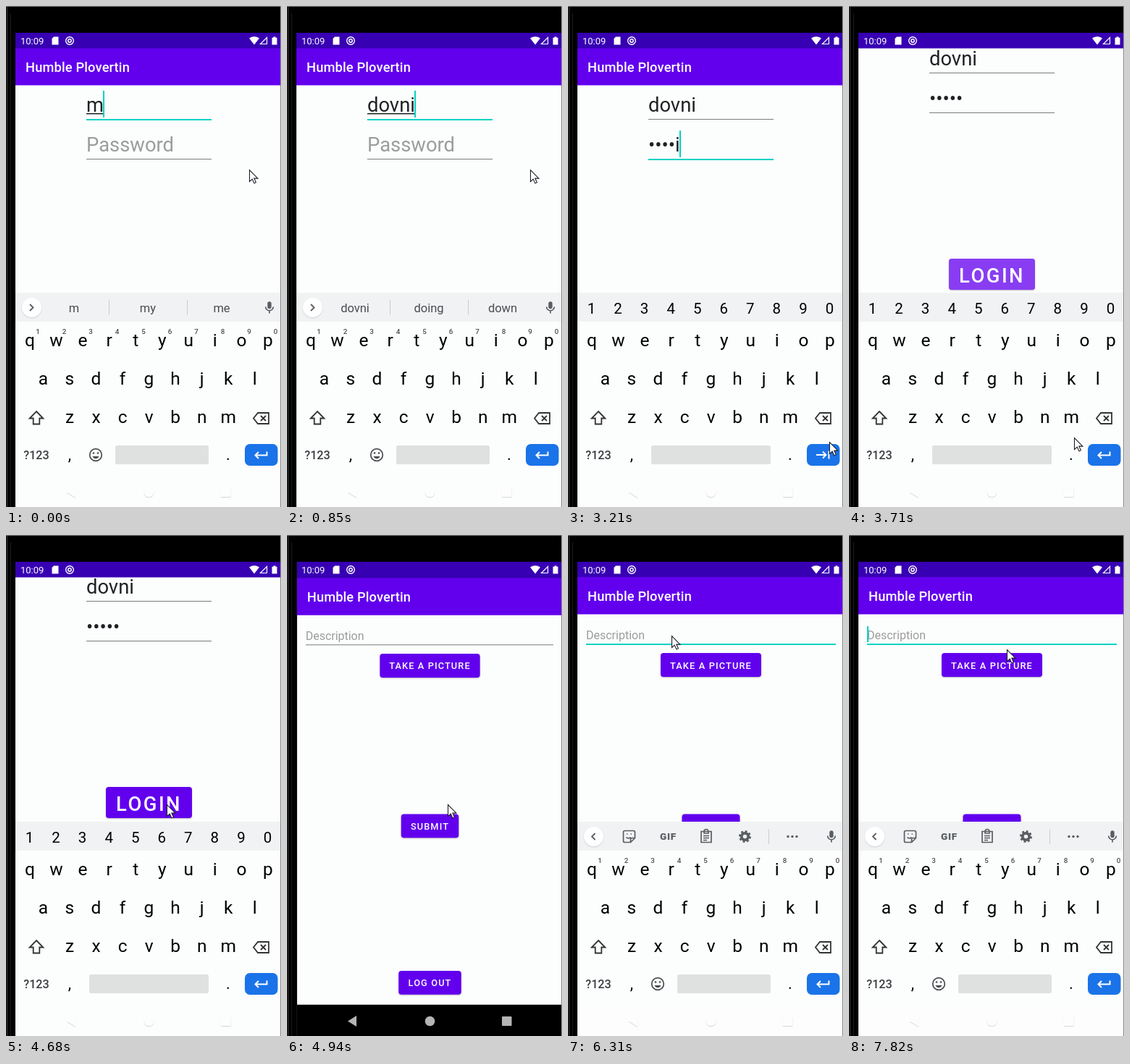
Recreate the animation shown at these times as an HTML page with a canvas. Size 380 by 692 pixels, loop 8 s.

```html
<!DOCTYPE html>
<html lang="en">
<head>
<meta charset="utf-8">
<title>Login demo</title>
<style>
  html, body { margin: 0; width: 100%; height: 100%; overflow: hidden; background: #000; }
  canvas { display: block; }
</style>
</head>
<body>
<canvas id="stage" width="380" height="692"></canvas>
<script>
const W = 380, H = 692, LOOP = 8000, TAU = Math.PI * 2;
const APP = 'Humble Plovertin', USER = 'dovni';
const PURPLE = '#6200ee', DARK_PURPLE = '#3700b3', TEAL = '#03d2c3', PAGE = '#fcfdfd';
const INK = '#202124', ICON = '#5a5d61', HINT = '#9c9c9c', LINE = '#7c7c7c', KEY = '#000';
const BIG = 27.4, SMALL = 12.8;

const stage = document.getElementById('stage').getContext('2d');
const layer = new OffscreenCanvas(W, H).getContext('2d');
let g = stage;

// Last row [time, ...values] that has begun.
const at = (t, rows) => rows.findLast(row => row[0] <= t).slice(1);
const within = (t, a, b) => t >= a && t < b;
const mixGray = (a, b, k) => { const v = Math.round(a + (b - a) * k); return `rgb(${v},${v},${v})`; };

function rect(x, y, w, h, color, radius = 0) {
  g.fillStyle = color;
  g.beginPath();
  g.roundRect(x, y, w, h, radius);
  g.fill();
}

function disc(x, y, r, color) {
  g.fillStyle = color;
  g.beginPath();
  g.arc(x, y, r, 0, TAU);
  g.fill();
}

function ring(x, y, r, color, width, dash = []) {
  g.strokeStyle = color;
  g.lineWidth = width;
  g.setLineDash(dash);
  g.beginPath();
  g.arc(x, y, r, 0, TAU);
  g.stroke();
  g.setLineDash([]);
}

function setFont(size, weight = 400, spacing = 0) {
  g.font = `${weight} ${size}px Roboto, sans-serif`;
  g.letterSpacing = spacing + 'px';
}

function text(str, x, y, size, color, { weight = 400, align = 'left', spacing = 0 } = {}) {
  setFont(size, weight, spacing);
  g.textAlign = align;
  g.fillStyle = color;
  g.fillText(str, x, y);
}

function shape(d, x, y, { fill, stroke, width = 1.8 }) {
  const path = new Path2D(d);
  g.save();
  g.translate(x, y);
  if (fill) { g.fillStyle = fill; g.fill(path); }
  if (stroke) { g.strokeStyle = stroke; g.lineWidth = width; g.stroke(path); }
  g.restore();
}

function withShadow(blur, dy, alpha, draw) {
  g.save();
  g.shadowColor = `rgba(0,0,0,${alpha})`;
  g.shadowBlur = blur;
  g.shadowOffsetY = dy;
  draw();
  g.restore();
}

// Draws a group off screen so that it fades as one.
function faded(alpha, draw) {
  layer.clearRect(0, 0, W, H);
  g = layer;
  draw();
  g = stage;
  g.globalAlpha = alpha;
  g.drawImage(layer.canvas, 0, 0);
  g.globalAlpha = 1;
}

function button(label, x, y, w, h, size, baseline, glow = 0) {
  withShadow(2, 1, 0.25, () => rect(x, y, w, h, PURPLE, 4));
  rect(x, y, w, h, `rgba(255,255,255,${glow})`, 4);
  text(label, x + w / 2, baseline, size, '#fff', { weight: 500, align: 'center', spacing: size * 0.089 });
}

function underline(x, y, w, focused) {
  rect(x, y, w, focused ? 2 : 1, focused ? TEAL : LINE);
}

function toolbar() {
  rect(13, 58, 368, 51.5, PURPLE);
  text(APP, 27, 91, 18.3, '#fff', { weight: 500, spacing: 0.15 });
}

function statusIcons() {
  text('10:09', 20, 53, 13, '#fff');
  shape('M-2-5.5H4.5V5.5H-4.5V-3z', 68, 48, { fill: '#fff' });
  ring(88, 48, 5.3, '#fff', 1.4);
  ring(88, 48, 2.2, '#fff', 1.5);
  shape('M-7-3.5Q0-8 7-3.5L0 5.5z', 343, 48, { fill: '#fff' });
  shape('M4.5-4.5V4.5H-4.5z', 356, 48, { stroke: '#fff', width: 1.2 });
  shape('M-1.5-5.5h3v1.2H3.5V5.5h-7V-4.3h2z', 371, 48, { fill: '#fff' });
}

// Icons turn from gray on black to white with a faint lower edge.
function navIcons(light) {
  const color = mixGray(181, 253, light);
  withShadow(1, 1, 0.16 * light, () => {
    shape('M-6 0L6-7.5V7.5z', 90, 671.5, { fill: color });
    disc(197.5, 671.5, 6.8, color);
    rect(297, 665, 13.5, 13, color, 1);
  });
}

function caretOn(t) {
  return !(within(t, 2340, 2850) || within(t, 3330, 3590) || within(t, 6310, 6810) || within(t, 7310, 7820));
}

function userText(t) {
  if (t < 250) return 'm';
  return USER.slice(0, Math.min(USER.length, Math.floor((t - 250) / 120)));
}

function passwordText(t) {
  if (t < 1360) return '';
  const count = Math.min(USER.length, 1 + Math.floor((t - 1360) / 120));
  return t < 3330 ? '•'.repeat(count - 1) + USER[count - 1] : '•'.repeat(count);
}

function bigField(value, hint, lineY, focused, composing, t) {
  const x = 111, baseline = lineY - 10;
  text(value || hint, x, baseline, BIG, value ? INK : HINT);
  const width = value ? g.measureText(value).width : 0;
  if (composing && width) rect(x, baseline + 2, width, 1.5, INK);
  if (focused && caretOn(t)) rect(Math.max(x, Math.round(x + width) - 1), lineY - 39, 2, 37, TEAL);
  underline(x, lineY, 173, focused);
}

function loginScreen(t) {
  const [scroll] = at(t, [[0, 0], [3590, 42], [3710, 64], [3830, 65]]);
  const [glow] = at(t, [[0, 0], [3590, 0.24], [4320, 0.19], [4440, 0.13], [4560, 0.06], [4680, 0]]);
  rect(13, 37, 366, 655, PAGE);
  g.save();
  g.translate(0, -scroll);
  toolbar();
  bigField(userText(t), 'Username', 156, t < 1100, t < 1100, t);
  bigField(passwordText(t), 'Password', 211, within(t, 1100, 3590), false, t);
  button('LOGIN', 138, 413, 119, 43, BIG, 445.5, glow);
  g.restore();
  rect(13, 37, 366, 21.5, DARK_PURPLE);
}

// Reaches a little past the glass so that its scaled form still fills it.
function postScreen(t) {
  const focused = t >= 5690;
  rect(13, 35, 368, 720, PAGE);
  rect(13, 35, 368, 24, DARK_PURPLE);
  toolbar();
  text('Description', 25, 144, 16, HINT);
  underline(25, 150, focused ? 345 : 344, focused);
  if (t >= 5830 && caretOn(t)) rect(25, 126, 2, 22, TEAL);
  button('TAKE A PICTURE', 128, 163, 139, 33, SMALL, 184.5);
  button('SUBMIT', 157.5, 385.5, 80, 33, SMALL, 406.7);
  button('LOG OUT', 154, 603, 87, 33, SMALL, 624.3);
}

function mic() {
  shape('M-2.7-5a2.7 2.7 0 0 1 5.4 0v4.5a2.7 2.7 0 0 1-5.4 0z', 364, 416, { fill: ICON });
  shape('M-5.3-.5a5.3 5.3 0 0 0 10.6 0M0 5v3.5', 364, 416, { stroke: ICON, width: 1.7 });
}

function expander(closed) {
  withShadow(2, 1, 0.14, () => disc(35.5, 416.5, 13.5, '#fff'));
  shape(closed ? 'M-2.5-4.5L2 0-2.5 4.5' : 'M2-4.5L-2.5 0 2 4.5', 35.5, 416.5, { stroke: ICON });
}

function toolStrip() {
  const pen = { stroke: ICON, width: 1.7 };
  expander(false);
  shape('M-8-6a2 2 0 0 1 2-2H6a2 2 0 0 1 2 2V2L2 8H-6a2 2 0 0 1-2-2zM8 2H4a2 2 0 0 0-2 2V8M-4 1a4 4 0 0 0 6 0M-3.5-3.5h1.5M2-3.5h1.5', 84.5, 416.5, pen);
  text('GIF', 138.5, 421.3, 13.5, ICON, { weight: 900, align: 'center', spacing: 0.8 });
  shape('M-7-6.5H7V8.5H-7zM-3-6.5a3 3 0 0 1 6 0v2.5H-3zM-4-.5H4M-4 2.5H4M-4 5.5H1', 191, 416, pen);
  ring(244.5, 416.5, 7, ICON, 3, [TAU * 7 / 16, TAU * 7 / 16]);
  ring(244.5, 416.5, 4.7, ICON, 3.8);
  rect(277, 406, 1, 21, '#cbcdd0');
  for (const x of [304, 310, 316]) disc(x, 416.5, 1.7, ICON);
  mic();
}

function wordStrip(t) {
  const words = at(t, [
    [0, 'm', 'my', 'me'], [370, 'd', 'do', 'did'], [490, 'do', 'don’t', 'down'],
    [610, 'dov', 'dove', 'doves'], [730, 'dovn', 'down', 'dove'], [850, USER, 'doing', 'down'],
  ]);
  expander(true);
  words.forEach((word, i) => text(word, 94 + i * 102, 422.5, 16.5, '#4a4c50', { align: 'center' }));
  rect(142, 406, 1, 21, '#cbcdd0');
  rect(250, 406, 1, 21, '#cbcdd0');
  mic();
}

function keyRow(letters, x, y, size = 24.5) {
  [...letters].forEach((key, i) => text(key, x + i * 36.55, y, size, KEY, { align: 'center' }));
}

function keyboard(t, strip) {
  const secret = strip === 'digits';
  rect(13, 396, 366, 296, PAGE);
  rect(13, 396, 366, 40, '#f0f2f4');
  if (secret) keyRow('1234567890', 32.5, 425, 20.5);
  else if (strip === 'tools') toolStrip();
  else wordStrip(t);

  keyRow('qwertyuiop', 33, 470);
  keyRow('asdfghjkl', 51.3, 523);
  keyRow('zxcvbnm', 88, 576);
  if (!secret) [...'1234567890'].forEach((n, i) =>
    text(n, 44 + i * 36.5, 452.5, 9.8, '#4a4c50', { weight: 500, align: 'center' }));

  shape('M0-9L9.3.5H4.3V8.5H-4.3V.5H-9.3z', 42, 569, { stroke: '#333' });
  shape('M-4.5-7.5H10.5V7.5H-4.5L-10.5 0zM-.5-3.5l7 7m0-7l-7 7', 352.5, 569.5, { stroke: '#333' });
  text('?123', 42, 626, 16.2, '#3c3e42', { weight: 500, align: 'center' });
  text(',', 88, 627, 22, KEY, { align: 'center' });
  text('.', 307, 627, 22, KEY, { align: 'center' });
  const spaceX = secret ? 115 : 151;
  rect(spaceX, 607, 280 - spaceX, 26, '#dfe1e1', 2.5);
  if (!secret) {
    ring(124, 620, 8.3, '#4a4c50', 1.7);
    disc(121, 617.5, 1.3, '#4a4c50');
    disc(127, 617.5, 1.3, '#4a4c50');
    shape('M-4.5 2a4.8 4.8 0 0 0 9 0z', 124, 620, { fill: '#4a4c50' });
  }
  rect(330, 605, 45.5, 30, '#1a73e8', 7);
  const toNext = within(t, 1100, 3590);
  shape(toNext ? 'M-9.5 0H4M-.5-4.5L4 0-.5 4.5M8-5.5V5.5' : 'M8-4.5V.5H-7.5M-3.5-4L-8 .5-3.5 5',
    352.5, 620, { stroke: '#fff', width: 2 });
}

function pointer(t) {
  const [x, y] = at(t, [
    [0, 336, 226],
    [2730, 338, 246], [2850, 343, 330], [2970, 350, 440], [3090, 357, 540], [3210, 361, 602], [3330, 362, 621],
    [3590, 350, 616], [3710, 311, 596], [3830, 268, 505], [3950, 234, 412], [4070, 222, 372],
    [5210, 218, 352], [5330, 196, 272], [5450, 166, 190], [5570, 148, 148], [5690, 143, 139],
    [7820, 218, 158],
  ]);
  shape('M0 0V16L3.8 12.6 6.4 18.4 8.9 17.3 6.4 11.6H11.4z', x + 0.5, y + 0.5,
    { fill: '#fff', stroke: '#1c1c24', width: 1.1 });
}

function bezel() {
  rect(0, 0, W, 37, '#000');
  rect(0, 0, 13, H, '#000');
  rect(1, 0, 1, H, '#3a3a3a');
  rect(6, 10, 1, H, '#1c1c1c');
  rect(0, 0, W, 1, '#777');
  rect(379, 0, 1, H, '#888');
}

function scaledPost(t, scale) {
  g.save();
  g.translate(196, 380);
  g.scale(scale, scale);
  g.translate(-196, -380);
  postScreen(t);
  rect(13, 650, 368, 110, '#000');
  g.restore();
}

function loginScene(t) {
  loginScreen(t);
  keyboard(t, t >= 1100 ? 'digits' : within(t, 250, 370) ? 'tools' : 'words');
  navIcons(1);
  if (t >= 4820) faded(0.6, () => scaledPost(t, 0.95));
}

function postScene(t) {
  const [shift, alpha, navMix] = at(t, [
    [0, 60, 0, 0], [5830, 60, 0.25, 0.25], [5950, 15, 0.79, 0.75], [6070, 4, 0.95, 0.95], [6190, 0, 1, 1],
  ]);
  rect(13, 37, 366, 655, '#000');
  scaledPost(t, t < 5060 ? 0.995 : 1);
  if (alpha) {
    faded(alpha, () => {
      g.save();
      g.beginPath();
      g.rect(13, 396, 366, 254);
      g.clip();
      g.translate(0, shift);
      keyboard(t, 'tools');
      g.restore();
    });
    rect(13, 650, 366, 42, mixGray(0, 253, navMix));
  }
  navIcons(navMix);
}

function frame() {
  const t = performance.now() % LOOP;
  g.clearRect(0, 0, W, H);
  (t < 4940 ? loginScene : postScene)(t);
  statusIcons();
  bezel();
  pointer(t);
  requestAnimationFrame(frame);
}
frame();
</script>
</body>
</html>
```
